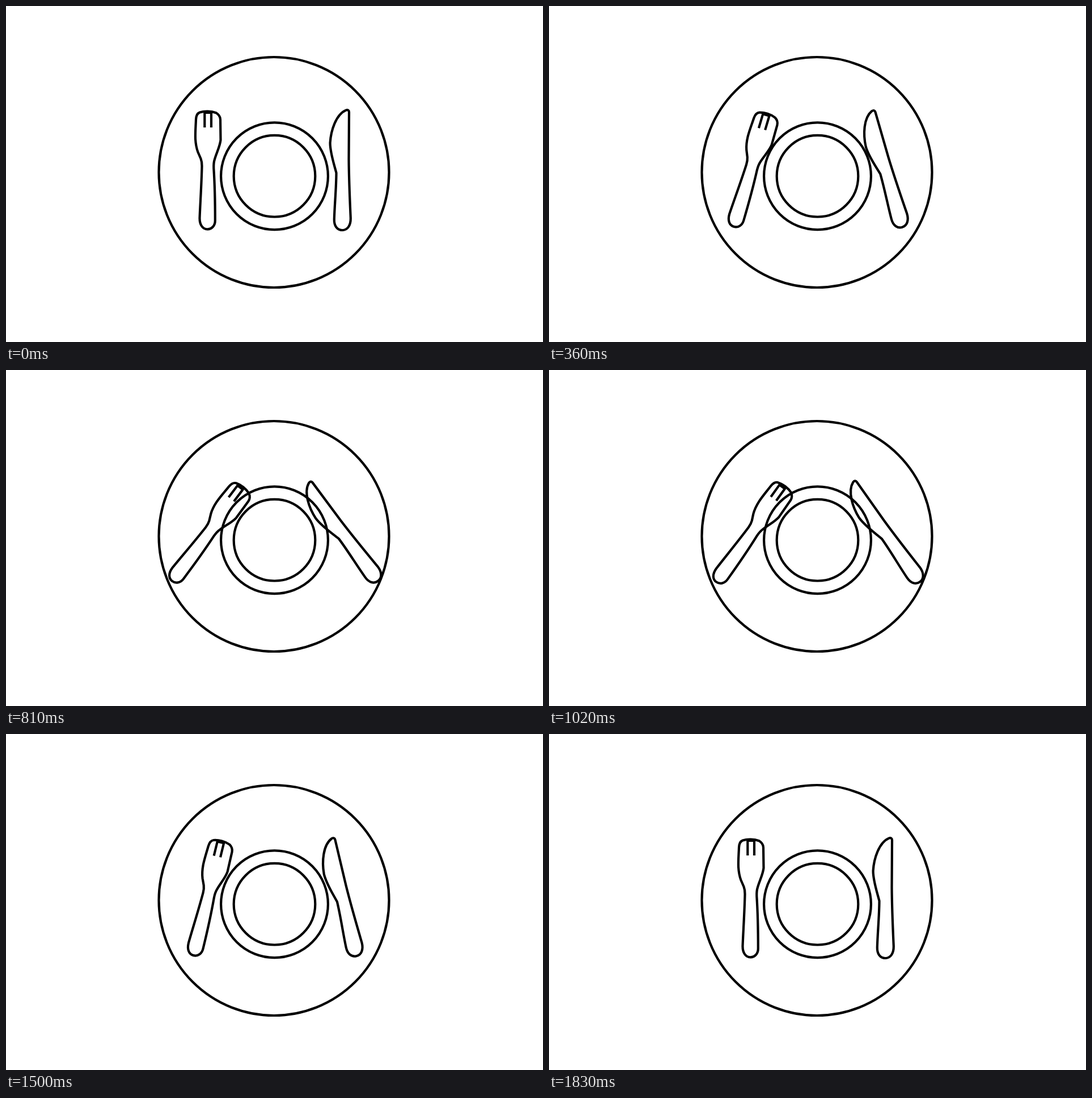
An HTML page with a canvas that plays this animation: 947 by 592 pixels, repeating every 1.86 s.

```html
<!DOCTYPE html>
<html lang="en">
<head>
<meta charset="utf-8">
<title>Table setting</title>
<style>
  html, body { margin: 0; width: 100%; height: 100%; overflow: hidden; background: #fff; }
  canvas { display: block; }
</style>
</head>
<body>
<canvas id="stage" width="947" height="592"></canvas>
<script>
const ctx = document.getElementById('stage').getContext('2d');
const LOOP = 1860, STEP = 30, HALF = 900, SWING = 41.1;

const fork = new Path2D(
  'M341.5 187.5 C336.5 189.5 335.2 195 335 200 C334.6 212 333.6 222 334 234 ' +
  'C334.5 243 336 251 338.5 257.5 L343.5 269 C345.2 273.5 345.6 277 345.5 282 ' +
  'C345 310 342.4 350 341.5 374 C341.5 386 347 393.2 355.2 393.3 ' +
  'C363 393.3 368.8 387 368.8 378 C368.8 345 368.5 320 366.3 286 ' +
  'C366 279 366.3 275 368 270 C371 259 377.5 247 378.5 236 L378 200 ' +
  'C377.8 195 375 191 370.5 188.3 C362 185 350 184.6 341.5 187.5 Z');
const tines = new Path2D('M350.3 214 V188 H362 V214');
const knife = new Path2D(
  'M599.5 183.6 C603 182.4 605 184 605 187 L604.5 270 C604.8 310 606.5 345 607.8 374 ' +
  'C608 387 602 395 593 395 C584 395 578.5 387.5 578.8 376 ' +
  'C579.5 350 582.5 320 582.5 294 C577.5 275 571.5 258 571.6 241 ' +
  'C573 219 582 191 599.5 183.6 Z');

function ring(x, y, r) {
  ctx.beginPath();
  ctx.arc(x, y, r, 0, Math.PI * 2);
  ctx.stroke();
}

function turned(path, x, y, deg) {
  ctx.save();
  ctx.translate(x, y);
  ctx.rotate(deg * Math.PI / 180);
  ctx.translate(-x, -y);
  ctx.stroke(path);
  ctx.restore();
}

// Linear swing out and back, then a short rest.
function angleAt(ms) {
  return SWING * Math.max(0, 1 - Math.abs(ms - HALF) / HALF);
}

function draw(ms) {
  const angle = angleAt(ms);
  ctx.fillStyle = '#fff';
  ctx.fillRect(0, 0, 947, 592);
  ctx.strokeStyle = '#000';
  ctx.lineWidth = 4.2;
  ctx.lineJoin = 'round';
  ring(472.5, 293, 203);
  ring(473.5, 299.7, 94.4);
  ring(473.5, 299.7, 71.8);
  turned(fork, 356, 289.5, angle);
  turned(tines, 356, 282.5, angle);
  turned(knife, 589.8, 289, -angle);
}

const start = performance.now();
function tick() {
  const t = (performance.now() - start) % LOOP;
  draw(Math.floor(t / STEP) * STEP);
  requestAnimationFrame(tick);
}
tick();
</script>
</body>
</html>
```
